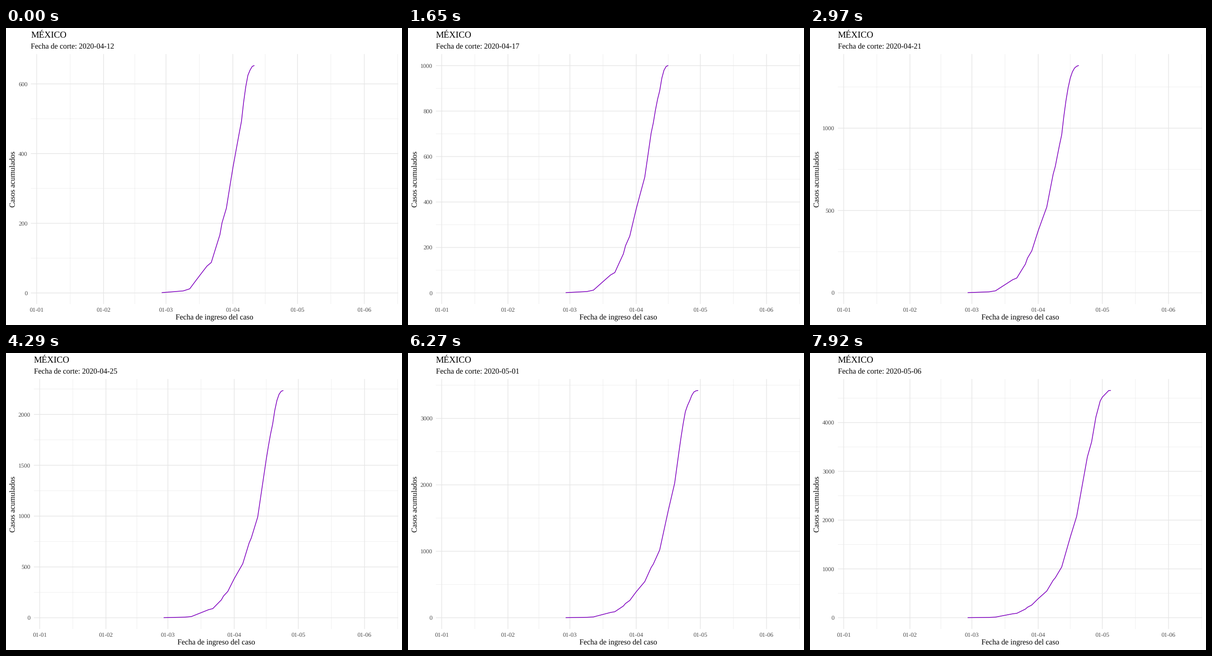
A matplotlib script that plays this animation: 864x648 px, repeating every 8 s.

```python
import numpy as np
import matplotlib.pyplot as plt
from matplotlib.animation import FuncAnimation

plt.rcParams.update({"font.family": "Liberation Serif", "text.hinting": "none"})

W, H, DPI = 864, 648, 108
PX = 72 / DPI
RIGHT, TOP, BOTTOM = 855.75, 56.9, 602.2
STEP_MS, HOLD_MS, LOOP_MS = 20, 330, 8000

# Days are counted from January 1st.
FIRST_DAY, FIRST_END, LAST_REPORT = 58, 101, 24
MONTHS = np.array([0, 31, 60, 91, 121, 152])
MID_MONTHS = MONTHS + np.array([31, 29, 31, 30, 31, 31]) / 2

# Bends of the curve in the last report: day and cumulative cases.
BENDS = [(58, 1), (68, 6), (71, 12), (79, 79), (81, 90), (85, 176), (86, 214),
         (88, 260), (91, 390), (95, 546), (98, 766), (99, 818), (102, 1039),
         (106, 1650), (109, 2077), (114, 3294), (116, 3604), (118, 4112),
         (120, 4440), (121, 4520), (124, 4656), (125, 4658)]

# Totals of some earlier reports; they set how late cases were recorded.
TOTALS = {0: 653, 5: 1001, 9: 1381, 13: 2236, 16: 2721, 19: 3421}
LAST_DELAY = 9


def recorded(lag, delay):
    """Share of a day's cases recorded after lag days."""
    u = np.clip((lag + 1) / delay, 0, 1)
    return u * u * (3 - 2 * u) * (0.82 + 0.18 * np.clip(lag / 30, 0, 1))


all_days = np.arange(FIRST_DAY, FIRST_END + LAST_REPORT + 1)
latest = np.interp(all_days, *zip(*BENDS))
new_cases = (np.diff(latest, prepend=0)
             / recorded(all_days[-1] - all_days, LAST_DELAY))


def curve(report, delay):
    days = np.arange(FIRST_DAY, FIRST_END + report + 1)
    share = recorded(days[-1] - days, delay)
    return days, np.cumsum(new_cases[:len(days)] * share)


def fit_delay(report, total):
    """Delay at which the report's curve ends at the given total."""
    delays = np.linspace(25, 2, 300)
    ends = [curve(report, d)[1][-1] for d in delays]
    return np.interp(total, ends, delays)


delay_days = list(TOTALS) + [LAST_REPORT]
delay_values = [fit_delay(*item) for item in TOTALS.items()] + [LAST_DELAY]


def tick_step(span):
    """Round step that cuts the span into about four parts."""
    cell = span / 4
    base = 10 ** np.floor(np.log10(cell))
    unit = base
    for mult, bias in ((2, 1.5), (5, 2.75), (10, 1.5)):
        if mult * base - cell < bias * (cell - unit):
            unit = mult * base
    return int(unit)


def segments(xs, ys, left):
    """Vertical lines at xs and horizontal lines at ys, as one broken path."""
    px, py = [], []
    for y in ys:
        px += [left, RIGHT, np.nan]
        py += [y, y, np.nan]
    for x in xs:
        px += [x, x, np.nan]
        py += [TOP, BOTTOM, np.nan]
    return px, py


fig = plt.figure(figsize=(W / DPI, H / DPI), dpi=DPI, facecolor="white")
ax = fig.add_axes([0, 0, 1, 1])
ax.set_xlim(0, W)
ax.set_ylim(H, 0)
ax.axis("off")


def path(color, width):
    line, = ax.plot([], [], color=color, lw=width * PX, solid_capstyle="butt",
                    solid_joinstyle="round", snap=False)
    return line


def label(x, y, text="", size=11, color="black", ha="left", **kw):
    return ax.text(x, y, text, fontsize=size, color=color, ha=ha,
                   va="baseline", **kw)


minor = path("#ebebeb", 0.8)
major = path("#e8e8e8", 1.6)
cases = path("#7f00bf", 1.6)

title = label(0, 21.8, "MÉXICO", 13.2)
subtitle = label(0, 45.5)
x_title = label(0, 636.7, "Fecha de ingreso del caso", ha="center")
label(19.8, (TOP + BOTTOM) / 2, "Casos acumulados", ha="center",
      rotation=90, rotation_mode="anchor")
x_labels = [label(0, 618.7, f"01-{m:02d}", 8.8, "#4d4d4d", "center")
            for m in range(1, 7)]
y_labels = [label(0, 0, "", 8.8, "#4d4d4d", "right") for _ in range(8)]


def show(report):
    days, counts = curve(report, np.interp(report, delay_days, delay_values))
    low, high = counts[0], counts[-1]
    span = high - low
    step = tick_step(span)
    limit = high + 0.05 * span
    ticks = np.arange(0, limit, step)
    halves = np.arange(step / 2, limit, step)
    left = 60.8 if ticks[-1] >= 1000 else 54.2

    def px(day):
        return left + (RIGHT - left) * (0.016 + 0.005866 * np.asarray(day))

    def py(count):
        share = (np.asarray(count) - low) / span
        return BOTTOM - (BOTTOM - TOP) * (share + 0.05) / 1.1

    minor.set_data(*segments(px(MID_MONTHS), py(halves), left))
    major.set_data(*segments(px(MONTHS), py(ticks), left))
    cases.set_data(px(days), py(counts))

    title.set_x(left)
    subtitle.set_x(left)
    x_title.set_x((left + RIGHT) / 2)
    date = 12 + report
    month, date = (4, date) if date <= 30 else (5, date - 30)
    subtitle.set_text(f"Fecha de corte: 2020-{month:02d}-{date:02d}")
    for text, x in zip(x_labels, px(MONTHS)):
        text.set_x(x)
    for i, text in enumerate(y_labels):
        text.set_visible(i < len(ticks))
        if i < len(ticks):
            text.set_text(str(int(ticks[i])))
            text.set_position((left - 7.4, py(ticks[i]) + 4.5))


def update(i):
    show((i * STEP_MS + STEP_MS // 2) // HOLD_MS)
    return []


anim = FuncAnimation(fig, update, frames=LOOP_MS // STEP_MS, interval=STEP_MS,
                     init_func=lambda: update(0), repeat=True, repeat_delay=0)
plt.show()
```
